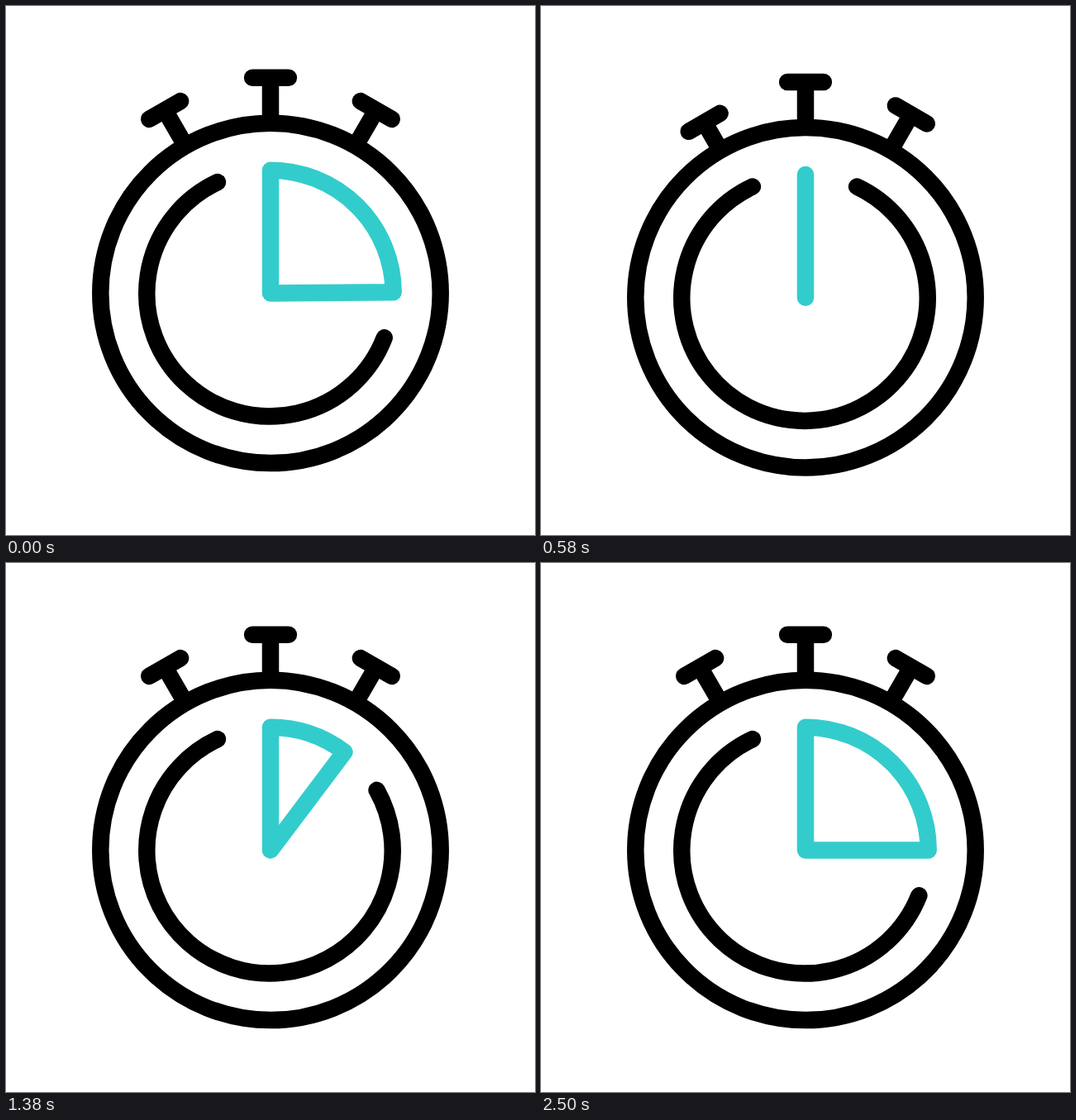
Animation, 640 px wide and 640 px high, one loop 3.6 s. Source, as an HTML page:

```html
<!DOCTYPE html>
<html lang="en">
<head>
<meta charset="utf-8">
<title>Stopwatch</title>
<style>
html, body { margin: 0; width: 100%; height: 100%; overflow: hidden; background: #fff; }
svg { display: block; width: 100vw; height: 100vh; }
path, circle { fill: none; stroke: #000; stroke-width: 20.5; stroke-linejoin: round; }
.round { stroke-linecap: round; }
#wedge { stroke: #33cccc; }
</style>
</head>
<body>
<svg viewBox="0 0 640 640">
  <g id="watch">
    <circle r="205.7"/>
    <path id="top"/><path id="topCap" class="round"/>
    <path id="left" transform="rotate(-30)"/><path id="leftCap" class="round" transform="rotate(-30)"/>
    <path id="right" transform="rotate(30)"/><path id="rightCap" class="round" transform="rotate(30)"/>
    <path id="dial" class="round"/>
    <path id="wedge" class="round"/>
  </g>
</svg>
<script>
const LOOP = 3600, R = 148.7;
const el = id => document.getElementById(id);
const draw = (id, d) => el(id).setAttribute('d', d);
const ramp = (t, from, to) => Math.min(1, Math.max(0, (t - from) / (to - from)));

// Point on the dial, in degrees clockwise from twelve o'clock
const point = (deg, x = 0, y = 0) => {
  const a = deg * Math.PI / 180;
  return `${x + R * Math.sin(a)} ${y - R * Math.cos(a)}`;
};

function button(id, height) {
  draw(id, `M0 ${-height}V-206`);
  draw(id + 'Cap', `M-21.9 ${-height}H21.9`);
}

function render(t) {
  const press = ramp(t, 150, 317);
  const sink = 6 * (press - ramp(t, 550, 850));
  const push = 13.7 * (press - ramp(t, 550, 700));
  const angle = t < 600 ? 90 * (1 - ramp(t, 0, 220)) : 90 * ramp(t, 600, 2500);

  el('watch').setAttribute('transform', `translate(320 ${347.4 + sink})`);
  button('left', 255.6 - push);
  draw('dial', `M${point(-25.1, -1, .4)}A${R} ${R} 0 1 0 ${point(25.1 + angle * .96, -1, .4)}`);
  draw('wedge', `M0 0L${point(0)}A${R} ${R} 0 0 1 ${point(angle)}Z`);
}

function tick() {
  render(performance.now() % LOOP);
  requestAnimationFrame(tick);
}

button('top', 260.7);
button('right', 255.6);
tick();
</script>
</body>
</html>
```
